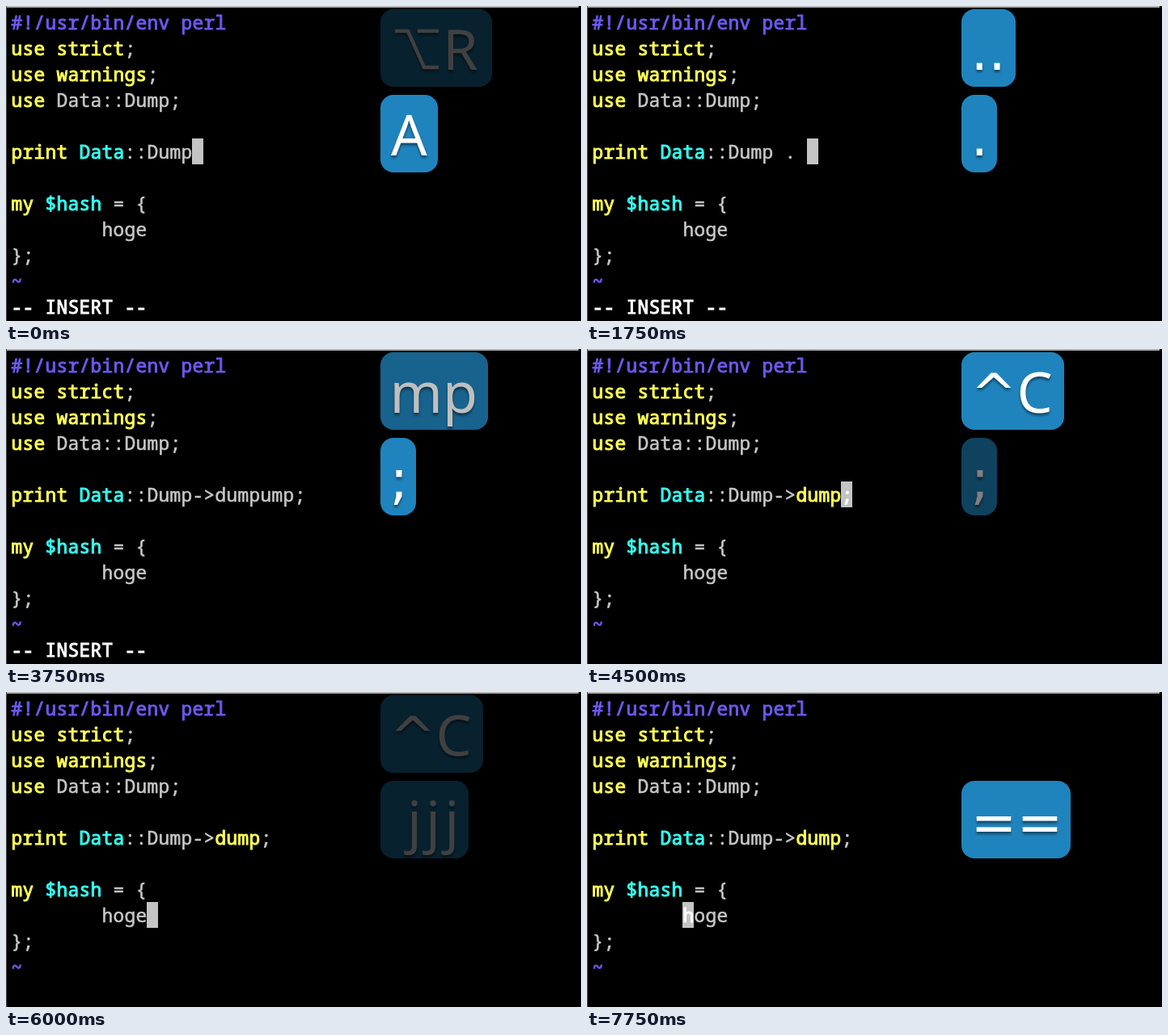
These frames come from a looping animation (711 px wide and 390 px high, 8000 ms). An HTML page:

```html
<!DOCTYPE html>
<html lang="en">
<head>
<meta charset="utf-8">
<title>Editing a Perl script</title>
<style>
  html, body { margin: 0; width: 100%; height: 100%; overflow: hidden; background: #000; }
  svg { display: block; width: 711px; height: 390px; }
  text { white-space: pre; }
  .code { font: 22.8px "Noto Sans Mono", monospace; letter-spacing: .32px; stroke-width: .6px; }
  .bold { stroke-width: 1px; }
  .key { font: 70px "Noto Sans", sans-serif; fill: #fff; }
  .sign { font: 68px "DejaVu Sans", sans-serif; }
  .glyphs { filter: drop-shadow(0 3px 1.5px rgba(0, 0, 0, .45)); }
</style>
</head>
<body>
<svg id="stage" viewBox="0 0 711 390"></svg>
<script>
const STEP = 250, LOOP = 8000;
const CELL = 14, LINE = 32, LEFT = 6, TOP = 4;
const GREY = '#c7c7c7', YELLOW = '#ffff55', CYAN = '#35fff2', VIOLET = '#6b59ee', WHITE = '#fff';

// Each entry holds from its step until the next entry.
const tails = [
  [0, ''], [4, '->'], [5, ' . '], [8, '->'], [10, '->d'], [11, '->du'],
  [14, '->dumpump'], [15, '->dumpump;'], [16, '->dump;']
];
// step, row, column, character under the cursor
const cursors = [
  [0, 5, 16], [4, 5, 18], [5, 5, 19], [8, 5, 18], [10, 5, 19], [11], [16, 5, 23],
  [18, 5, 22, ';'], [19, 6, 0], [20, 7, 11, '{'], [21, 8, 12], [31, 8, 8, 'h']
];
// step, keys, step where the fade begins
const upper = [
  [0, '⌥R', -2], [4, '.'], [5, '..', 8], [10, 'd'], [11, 'du', 12], [14, 'mp', 15], [18, '^C', 22]
];
const lower = [
  [0, 'A', 3], [7, '.', 8], [15, ';', 17], [19, 'j'], [20, 'jj'], [21, 'jjj', 22], [26, '='], [29, '==']
];
const INSERT_END = 18;

const widths = {
  '⌥R': 138, 'A': 71, '.': 44, '..': 67, ';': 44, 'd': 66, 'du': 110, 'mp': 133,
  '^C': 127, 'j': 61, 'jj': 85, 'jjj': 109, '=': 78, '==': 135
};

const stage = document.getElementById('stage');

function add(parent, name, attrs, text) {
  const el = document.createElementNS('http://www.w3.org/2000/svg', name);
  for (const k in attrs) el.setAttribute(k, attrs[k]);
  if (text !== undefined) el.textContent = text;
  parent.appendChild(el);
  return el;
}

const rect = (parent, x, y, width, height, fill, rx = 0) =>
  add(parent, 'rect', { x, y, width, height, fill, rx });

function write(parent, row, col, text, fill) {
  return add(parent, 'text', {
    x: LEFT + col * CELL + 0.5, y: TOP + row * LINE + 25, fill, stroke: fill,
    class: fill === GREY ? 'code' : 'code bold'
  }, text);
}

rect(stage, 0, 0, 711, 390, '#000');
rect(stage, 0, 0, 708, 2, '#b0b0b0');
rect(stage, 0, 0, 1, 390, '#4a4d52');
const cursorLayer = add(stage, 'g');

[
  [0, 0, '#!/usr/bin/env perl', VIOLET],
  [1, 0, 'use strict', YELLOW], [1, 10, ';', GREY],
  [2, 0, 'use warnings', YELLOW], [2, 12, ';', GREY],
  [3, 0, 'use', YELLOW], [3, 4, 'Data::Dump;', GREY],
  [5, 0, 'print', YELLOW], [5, 6, 'Data', CYAN], [5, 10, '::Dump', GREY],
  [7, 0, 'my', YELLOW], [7, 3, '$hash', CYAN], [7, 9, '= {', GREY],
  [8, 8, 'hoge', GREY], [9, 0, '};', GREY], [10, 0, '~', VIOLET]
].forEach(run => write(stage, ...run));

const live = add(stage, 'g');

const pick = (list, n) => list.filter(e => e[0] <= n).pop();

function drawTail(tail) {
  if (tail === '->dump;') {
    write(live, 5, 16, '->', GREY);
    write(live, 5, 18, 'dump', YELLOW);
    write(live, 5, 22, ';', GREY);
  } else {
    write(live, 5, 16, tail, GREY);
  }
}

function drawCursor([, row, col, under]) {
  if (row === undefined) return;
  rect(cursorLayer, LEFT + col * CELL, TOP + row * LINE, CELL, LINE, '#c4c4c4');
  if (under) write(live, row, col, under, WHITE);
}

function drawBubble(list, n, y) {
  const entry = pick(list, n);
  if (!entry) return;
  const [, keys, fade = Infinity] = entry;
  const opacity = n < fade ? 1 : 1 - (n - fade + 1) / 4;
  if (opacity <= 0) return;

  const group = add(live, 'g', { transform: `translate(463 ${y})`, opacity });
  rect(group, 0, 0, widths[keys], 96, '#1f84bd', 16);
  const glyphs = add(group, 'g', { class: 'glyphs' });
  let x = 11.5;
  if (keys[0] === 'A') x = 13;
  if (keys[0] === 'j') x = 33;
  if (keys[0] === '⌥') {
    add(glyphs, 'path', {
      d: 'M18 27H34L54 72H72M46 27H72', fill: 'none', stroke: WHITE, 'stroke-width': 4.5
    });
    x = 77;
  }
  const label = add(glyphs, 'text', { x, y: 75, class: 'key' });
  if (keys[0] === 'j') label.setAttribute('letter-spacing', 5);
  for (const c of keys.replace('⌥', ''))
    add(label, 'tspan', { class: '.;=^'.includes(c) ? 'sign' : '' }, c);
}

function draw(n) {
  live.replaceChildren();
  cursorLayer.replaceChildren();
  drawTail(pick(tails, n)[1]);
  drawCursor(pick(cursors, n));
  if (n < INSERT_END) write(live, 11, 0, '-- INSERT --', WHITE);
  drawBubble(upper, n, 4);
  drawBubble(lower, n, 110);
}

let shown = -1;
const start = performance.now();
function tick() {
  const n = Math.floor(((performance.now() - start) % LOOP) / STEP);
  if (n !== shown) draw(shown = n);
  requestAnimationFrame(tick);
}
tick();
</script>
</body>
</html>
```
